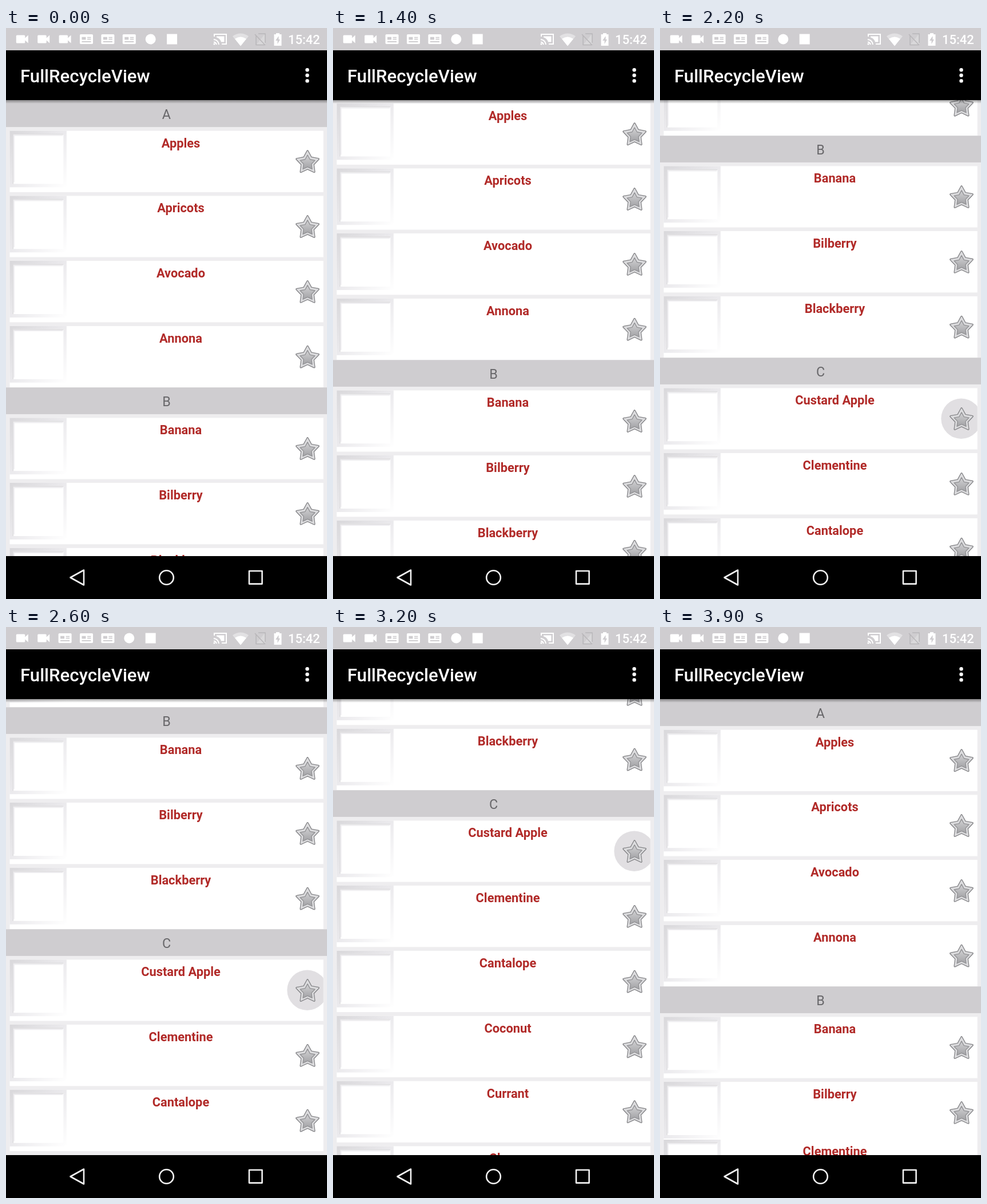
Write an HTML page that moves like this. It is 561 px wide and 998 px high and loops after 5.1 s.

```html
<!DOCTYPE html>
<html lang="en">
<head>
<meta charset="utf-8">
<title>FullRecycleView</title>
<style>
  html, body { margin: 0; height: 100%; overflow: hidden; background: #000; }
  body > svg { display: block; width: 100vw; height: 100vh; }
  text { font-family: Roboto, sans-serif; }
  .name { font-size: 21.8px; font-weight: 700; fill: #b12a28; text-anchor: middle; }
  .letter { font-size: 23.4px; fill: #68676a; text-anchor: middle; }
</style>
</head>
<body>
<svg viewBox="0 0 561 998">
  <defs>
    <linearGradient id="frameFill" x2="1" y2="1">
      <stop stop-color="#d9d8db"/><stop offset=".5" stop-color="#ebeaed"/><stop offset="1" stop-color="#fff"/>
    </linearGradient>
    <linearGradient id="starFill" x2="0" y2="1">
      <stop stop-color="#d2d2d4"/><stop offset="1" stop-color="#a2a2a5"/>
    </linearGradient>
    <linearGradient id="shadow" x2="0" y2="1">
      <stop stop-color="#000" stop-opacity=".36"/><stop offset="1" stop-color="#000" stop-opacity="0"/>
    </linearGradient>
    <g id="star" stroke-linejoin="round">
      <polygon class="starShape" stroke="#858588" stroke-width="3.6"/>
      <polygon class="starShape" fill="#dcdcde" stroke="#dcdcde" stroke-width="1"/>
      <polygon class="starShape" transform="translate(0 .4) scale(.68)" fill="url(#starFill)" stroke="#939396" stroke-width="2"/>
    </g>
    <g id="thumb">
      <rect width="99.6" height="99" fill="url(#frameFill)"/>
      <rect x="5.5" y="5.6" width="88.6" height="87.4" fill="#fff"/>
      <path d="M6 93V6.4H94" fill="none" stroke="#cfced1" stroke-width="1.6" opacity=".7"/>
      <path d="M7.5 90V8.2H93" fill="none" stroke="#eeedf0" stroke-width="2"/>
    </g>
    <path id="video" d="M-9.5 -7H3.5Q5 -7 5 -5.5V-2L10.5 -7V7L5 2V5.5Q5 7 3.5 7H-9Q-10.5 7 -10.5 5.5V-5.5Q-10.5 -7 -9 -7Z"/>
    <g id="news">
      <rect x="-11.5" y="-8.5" width="23" height="17" rx="1.8"/>
      <path d="M-8 -3.8H-1V1H-8ZM1.5 -3.8H8V-2H1.5ZM1.5 -.8H8V1H1.5ZM-8 3.6H8V5.4H-8Z" fill="#cfcdd0"/>
    </g>
    <circle id="dot" r="9"/>
    <rect id="block" x="-9" y="-9" width="18" height="18"/>
    <g id="list"></g>
  </defs>

  <rect width="561" height="998" fill="#eeedef"/>
  <use id="view" href="#list"/>
  <svg id="staleStrip" y="896" width="561" height="27" viewBox="0 896 561 27">
    <rect y="896" width="561" height="27" fill="#eeedef"/>
    <use href="#list" y="-288"/>
  </svg>

  <rect y="126" width="561" height="6" fill="url(#shadow)"/>
  <rect width="561" height="39" fill="#cfcdd0"/>
  <rect y="39" width="561" height="87" />
  <text x="25" y="95" font-size="31.2" font-weight="500" fill="#fff">FullRecycleView</text>
  <g fill="#fff">
    <circle cx="526.5" cy="73.2" r="3.2"/><circle cx="526.5" cy="82.8" r="3.2"/><circle cx="526.5" cy="92.4" r="3.2"/>
    <g id="notices"></g>
    <text x="493" y="28.3" font-size="22" font-weight="500">15:42</text>
    <path d="M396 14.5Q410 4.500 424 14.500L410 31.500Z" opacity=".4"/>
    <path d="M400 19Q410 12 420 19L410 31.500Z"/>
    <path d="M453 10V29.500H437Z" opacity=".22"/>
    <path d="M435 11L453 30M437 13V29.500H452M441 10H453V26" fill="none" stroke="#b8b6b9" stroke-width="1.5"/>
    <path d="M472 9H478V11H481.500V31H468.500V11H472Z"/>
    <path d="M476.500 14L471 22H474.500V28L479 20H476.500Z" fill="#cfcdd0"/>
    <g fill="none" stroke="#fff" stroke-width="2">
      <path d="M364 15V11H385V28H377M363 20Q371 21 372 29M363 24.500Q367 25 368 29"/>
      <path d="M368 14.500H381.500V24.500H376Q374 18 368 16.500Z" fill="#fff" stroke="none"/>
    </g>
    <circle cx="364" cy="28" r="1.600"/>
  </g>

  <rect y="923" width="561" height="75"/>
  <g fill="none" stroke="#f2f2f2" stroke-width="2.600" stroke-linejoin="round">
    <path d="M112.500 960.500L136 947.500V973.500Z"/>
    <circle cx="280.500" cy="960.500" r="12.300"/>
    <rect x="425" y="949" width="22.600" height="22.600"/>
  </g>
</svg>

<script>
const LOOP = 5100, STEP = 100;
const HEADER = 46.6, GAP = 6.3, CARD = 107.5;
const sections = {
  A: ["Apples", "Apricots", "Avocado", "Annona"],
  B: ["Banana", "Bilberry", "Blackberry"],
  C: ["Custard Apple", "Clementine", "Cantalope", "Coconut", "Currant", "Cherry"]
};
// [step, scroll offset]
const scrollKeys = [
  [0, 0], [13, 0], [14, 48], [18, 372], [19, 408], [20, 428], [21, 437], [22, 440],
  [25, 440], [26, 488], [29, 764], [30, 812], [31, 795], [32, 731], [35, 509],
  [38, 288], [39, 0], [51, 0]
];
const find = id => document.getElementById(id);

function starPoints(radius) {
  return Array.from({ length: 10 }, (_, i) => {
    const r = i % 2 ? radius * 0.53 : radius, a = i * Math.PI / 5;
    return `${(r * Math.sin(a)).toFixed(2)},${(-r * Math.cos(a)).toFixed(2)}`;
  }).join(" ");
}

function card(name, y) {
  const pressed = name === "Custard Apple" ? '<circle cx="520.2" cy="53.5" r="35.2" fill="#e1dfe2"/>' : "";
  return `<svg x="6.3" y="${y}" width="548.4" height="${CARD}">
    <rect width="549" height="${CARD}" fill="#fff"/><use href="#thumb"/>${pressed}
    <text class="name" x="299.2" y="29.3">${name}</text>
    <use href="#star" x="520.7" y="55.8"/></svg>`;
}

function buildList() {
  let y = 126.5, markup = "";
  for (const [letter, names] of Object.entries(sections)) {
    markup += `<rect y="${y}" width="561" height="${HEADER}" fill="#cfcdd0"/>
      <text class="letter" x="280.5" y="${y + 32.4}">${letter}</text>`;
    y += HEADER;
    for (const name of names) {
      markup += card(name, y + GAP);
      y += GAP + CARD;
    }
  }
  return markup;
}

function noticeIcons(videos) {
  const icons = [...Array(videos).fill("video"), "news", "news", "news", "dot", "block"];
  return icons.map((id, i) => `<use href="#${id}" x="${28.3 + i * 37.4}" y="19.5"/>`).join("");
}

function scrollAt(step) {
  const next = scrollKeys.findIndex(key => key[0] > step);
  const [s0, y0] = scrollKeys[next - 1], [s1, y1] = scrollKeys[next];
  return y0 + (y1 - y0) * (step - s0) / (s1 - s0);
}

let shown = -1;
function draw() {
  const step = Math.floor(performance.now() % LOOP / STEP);
  if (step !== shown) {
    shown = step;
    find("view").setAttribute("y", -scrollAt(step));
    find("staleStrip").style.display = step >= 39 ? "" : "none";
    find("notices").innerHTML = noticeIcons(step < 1 ? 3 : 2);
  }
  requestAnimationFrame(draw);
}

document.querySelectorAll(".starShape").forEach(p => p.setAttribute("points", starPoints(20)));
find("list").innerHTML = buildList();
draw();
</script>
</body>
</html>
```
